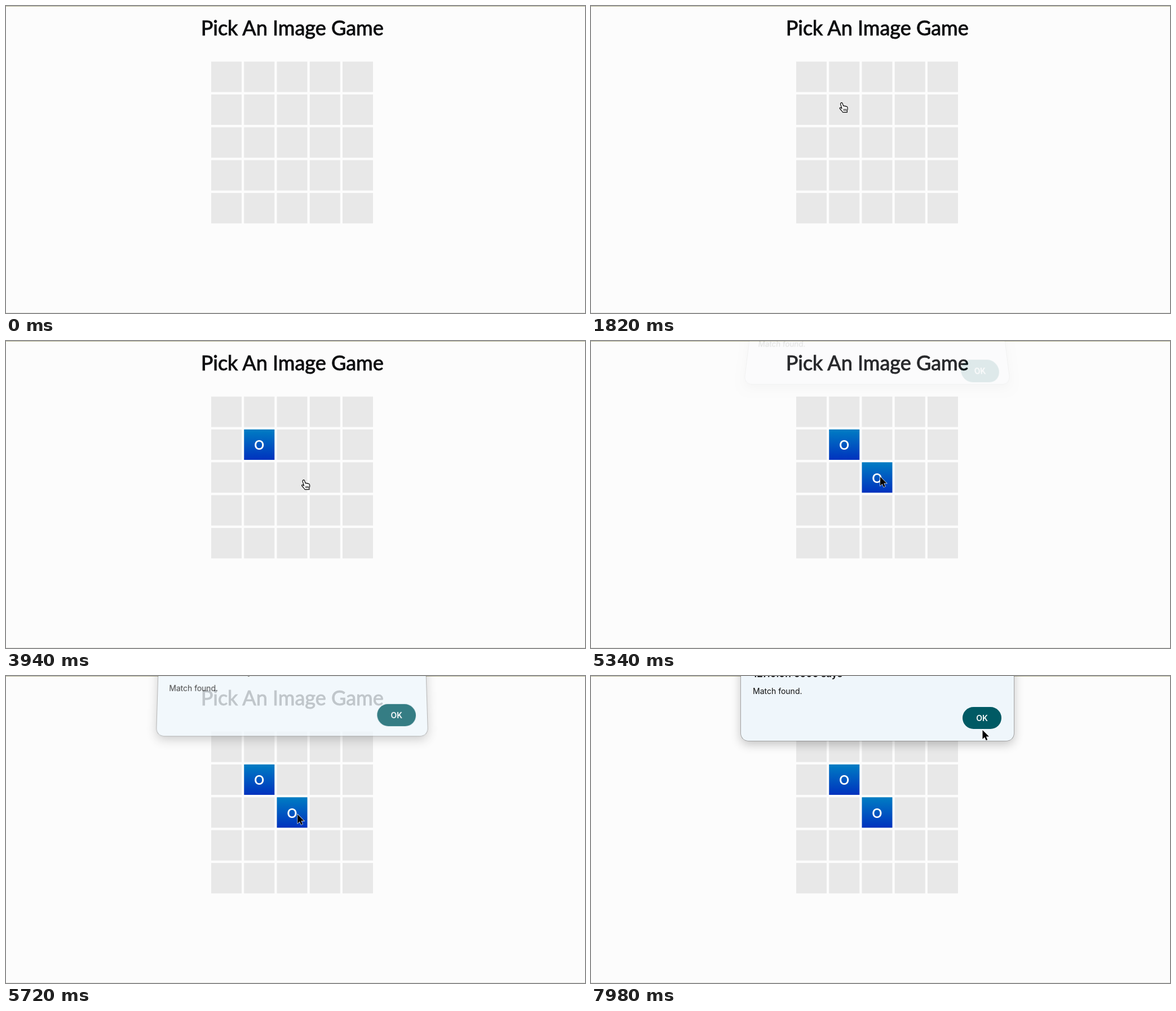
An HTML page for the animation above (8 s loop, 1027 by 545 pixels).

```html
<!DOCTYPE html>
<html lang="en">
<head>
<meta charset="utf-8">
<title>Pick An Image Game</title>
<style>
  html, body { margin: 0; width: 100%; height: 100%; overflow: hidden; background: #fcfcfc; }
  #stage { position: relative; width: 1027px; height: 545px; overflow: hidden; }
  svg { position: absolute; left: 0; top: 0; }
  #heading { font: 400 36px Lato, sans-serif; fill: #0c0d0f; stroke: #0c0d0f; stroke-width: .9px; text-anchor: middle; }
  .letter { font: 700 22px Lato, sans-serif; fill: #fff; text-anchor: middle; }
  #dialog { position: absolute; left: 0; top: 0; width: 1027px; height: 120px; transform-origin: 507.5px 0; font-family: Inter, sans-serif; }
  #dialog div { position: absolute; white-space: nowrap; }
  #panel { top: -60px; background: #eff6fb; border-radius: 13px;
    box-shadow: 0 0 0 .6px rgba(0,0,0,.45), 0 6px 18px rgba(0,0,0,.24); }
  #host { left: 287px; top: -16px; font: 600 17px/24px Inter, sans-serif; color: #111; }
  #message { left: 287px; top: 17px; font-size: 14px; line-height: 20px; color: #111; }
  #ok { left: 659px; top: 55px; width: 69px; height: 39px; border-radius: 20px; background: #005a64;
    color: #fff; font-weight: 600; font-size: 14px; line-height: 39px; text-align: center; }
</style>
</head>
<body>
<div id="stage">
  <svg width="1027" height="545">
    <defs>
      <linearGradient id="blue" x2="0" y2="1">
        <stop offset="0" stop-color="#007dc3"/>
        <stop offset="1" stop-color="#0032be"/>
      </linearGradient>
    </defs>
    <rect width="1027" height="545" fill="#fcfcfc"/>
    <rect width="1027" height="1" fill="#b3b092"/>
    <rect y="544" width="1027" height="1" fill="#e6e6e3"/>
    <text id="heading" x="507.7" y="52">Pick An Image Game</text>
    <g id="grid"></g>
  </svg>
  <div id="dialog">
    <div id="panel"></div>
    <div id="host">127.0.0.1:5500 says</div>
    <div id="message">Match found.</div>
    <div id="ok">OK</div>
  </div>
  <svg width="1027" height="545">
    <g id="cursor">
      <path id="arrow" d="M0 0V16L3.7 12.6L6.2 18.3L8.8 17.2L6.3 11.6H11.5Z" fill="#000" stroke="#fff" stroke-width="1.2" paint-order="stroke"/>
      <g id="hand" transform="translate(-4 -1)" stroke="#000" stroke-width="1.2" stroke-linejoin="round">
        <path fill="#fff" d="M3 1.5C4 .3 5.6 .5 6 1.8L7.6 6.6C8.3 5.8 9.6 5.8 10 7C10.8 6.2 12 6.5 12.4 7.6C13.4 7 14.6 7.5 14.9 8.8C15.6 11.5 15.4 13 14.2 15L14.4 17.6H6.6C5.8 15.6 3.4 14 1.4 11.2C.6 9.9 1.8 8.9 3 9.6L5 11L2.7 3.4C2.5 2.7 2.6 2 3 1.5Z"/>
        <path fill="none" stroke-width="1" d="M8.4 11.6V15.2M10.5 11.6V15.2M12.6 11.6V15.2"/>
      </g>
    </g>
  </svg>
</div>
<script>
const LOOP = 8000;
const ALERT = { start: 5273, length: 562 };
const $ = id => document.getElementById(id);
const clamp = v => Math.min(1, Math.max(0, v));

// Pointer tip: time, x, y
const PATH = [
  [20, 540, 505], [420, 636, 34], [720, 636, 34], [1520, 588, 152],
  [1820, 444, 172], [1960, 444, 172], [2260, 448, 178], [3200, 448, 178],
  [3900, 527.5, 247], [4040, 527.5, 247], [4500, 513, 241], [5600, 513, 241],
  [6180, 551, 283.5], [6840, 551, 283.5], [7400, 626, 121], [7700, 626, 121],
  [7970, 694.5, 96]
];
const FLIPS = [{ col: 1, row: 1, time: 2360 }, { col: 2, row: 2, time: 4760 }];

function add(parent, name, attrs, text) {
  const el = document.createElementNS("http://www.w3.org/2000/svg", name);
  for (const key in attrs) el.setAttribute(key, attrs[key]);
  if (text) el.textContent = text;
  return parent.appendChild(el);
}

function tile(parent, col, row, fill) {
  return add(parent, "rect", {
    x: 364 + col * 58.25, y: 98.7 + row * 58.3, width: 54, height: 54, fill
  });
}

for (let i = 0; i < 25; i++) tile($("grid"), i % 5, Math.floor(i / 5), "#e8e8e8");

for (const flip of FLIPS) {
  flip.el = add($("grid"), "g", {});
  tile(flip.el, flip.col, flip.row, "url(#blue)");
  add(flip.el, "text", {
    class: "letter", x: 391 + flip.col * 58.25, y: 135 + flip.row * 58.3
  }, "O");
}

function pointAt(t) {
  let i = 0;
  while (i < PATH.length - 2 && t >= PATH[i + 1][0]) i++;
  const [t0, x0, y0] = PATH[i], [t1, x1, y1] = PATH[i + 1];
  const p = clamp((t - t0) / (t1 - t0));
  const e = p * p * (3 - 2 * p);
  return [x0 + (x1 - x0) * e, y0 + (y1 - y0) * e];
}

function drawDialog(t) {
  const shown = clamp((t - ALERT.start) / ALERT.length);
  const k = 1 - shown;
  const inset = 5.5 * k;
  $("dialog").style.opacity = shown;
  // Tilts back at the top and drops into place
  $("dialog").style.transform = k
    ? `matrix3d(1,0,0,0, 0,${1 + .02 * k},0,${-.00064 * k}, 0,0,1,0, 0,${-24.7 * k},0,${1 + .07 * k})`
    : "none";
  const panel = $("panel").style;
  panel.left = 265.5 + inset + "px";
  panel.width = 484 - 2 * inset + "px";
  panel.height = 175 - 21 * k + "px";
}

function drawCursor(t) {
  const [x, y] = pointAt(t);
  const overGrid = x > 364 && x < 651 && y > 98 && y < 386;
  const isHand = overGrid && t < ALERT.start;
  $("cursor").setAttribute("transform", `translate(${x} ${y})`);
  $("cursor").style.display = t < 20 ? "none" : "";
  $("hand").style.display = isHand ? "" : "none";
  $("arrow").style.display = isHand ? "none" : "";
}

function render(t) {
  for (const flip of FLIPS) flip.el.style.display = t >= flip.time ? "" : "none";
  drawDialog(t);
  drawCursor(t);
}

let start;
function tick(now) {
  start ??= now;
  render((now - start) % LOOP);
  requestAnimationFrame(tick);
}
render(0);
requestAnimationFrame(tick);
</script>
</body>
</html>
```
